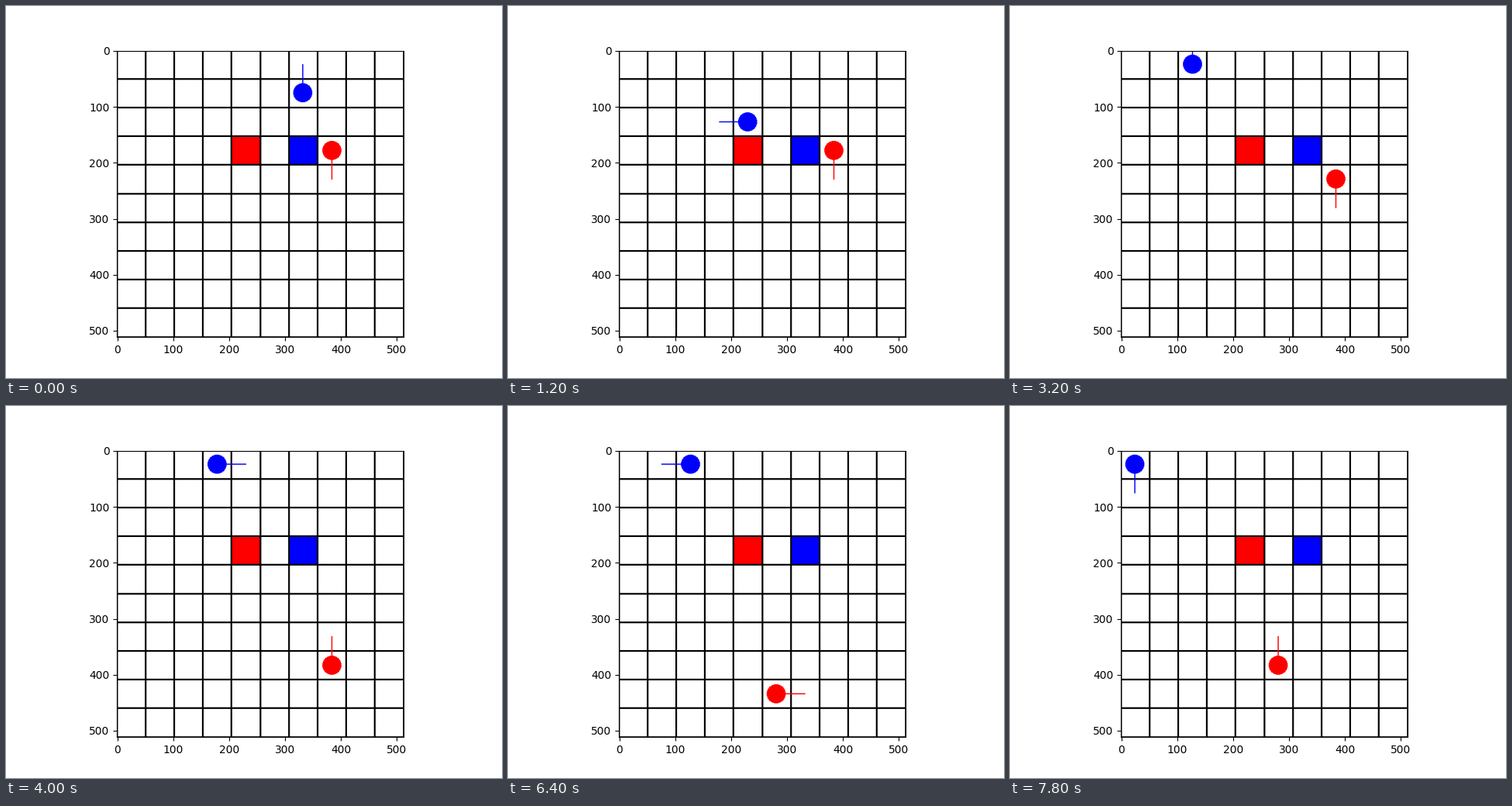
A matplotlib script that plays this animation: 640 px wide and 480 px high, repeating every 8 s.

```python
import numpy as np
import matplotlib.pyplot as plt
from matplotlib.animation import FuncAnimation

SIZE = 512
N = 10
CELL = SIZE / N
RADIUS = 17
STEP_MS = 200
RED, BLUE, BLACK = (255, 0, 0), (0, 0, 255), (0, 0, 0)
DIRS = {"N": (0, -1), "S": (0, 1), "W": (-1, 0), "E": (1, 0)}

# One letter per step: turn that way, or walk if already facing it.
BLUE_PLAN = "WWSSWW NNWWSN NWWNWN EENESW NSWWNE NWWNEW WNS"
RED_PLAN = "SWNNWS ENWNEN WNSSSS SNWWNW WSNWES SESEWS WNN"

yy, xx = np.mgrid[:SIZE, :SIZE]


def walk(col, row, face, plan):
    poses = [(col, row, face)]
    for turn in plan.replace(" ", ""):
        if turn == face:
            dx, dy = DIRS[face]
            col = min(max(col + dx, 0), N - 1)
            row = min(max(row + dy, 0), N - 1)
        face = turn
        poses.append((col, row, face))
    return poses


def center(i):
    return int((i + 0.5) * CELL)


def fill(img, x0, y0, x1, y1, color):
    img[max(y0, 0):max(y1, 0), max(x0, 0):max(x1, 0)] = color


def draw_board():
    img = np.full((SIZE, SIZE, 3), 255, np.uint8)
    for col, row, color in ((4, 3, RED), (6, 3, BLUE)):
        fill(img, int(col * CELL), int(row * CELL),
             int((col + 1) * CELL), int((row + 1) * CELL), color)
    for i in range(N + 1):
        p = int(i * CELL)
        fill(img, p - 1, 0, p + 2, SIZE, BLACK)
        fill(img, 0, p - 1, SIZE, p + 2, BLACK)
    return img


def draw_agent(img, pose, color):
    col, row, face = pose
    dx, dy = DIRS[face]
    x, y = center(col), center(row)
    tx, ty = center(col + dx), center(row + dy)
    if dx:
        fill(img, min(x, tx), y - 1, max(x, tx) + 1, y + 1, color)
    else:
        fill(img, x - 1, min(y, ty), x + 1, max(y, ty) + 1, color)
    img[(xx + 0.5 - x) ** 2 + (yy + 0.5 - y) ** 2 <= RADIUS ** 2] = color


blue_poses = walk(6, 1, "N", BLUE_PLAN)
red_poses = walk(7, 3, "S", RED_PLAN)
board = draw_board()


def scene(i):
    img = board.copy()
    draw_agent(img, blue_poses[i], BLUE)
    draw_agent(img, red_poses[i], RED)
    return img


fig, ax = plt.subplots(figsize=(6.4, 4.8), dpi=100)
view = ax.imshow(scene(0))


def update(i):
    view.set_data(scene(i))
    return (view,)


anim = FuncAnimation(fig, update, frames=len(blue_poses), interval=STEP_MS,
                     repeat=True, repeat_delay=0)
plt.show()
```
